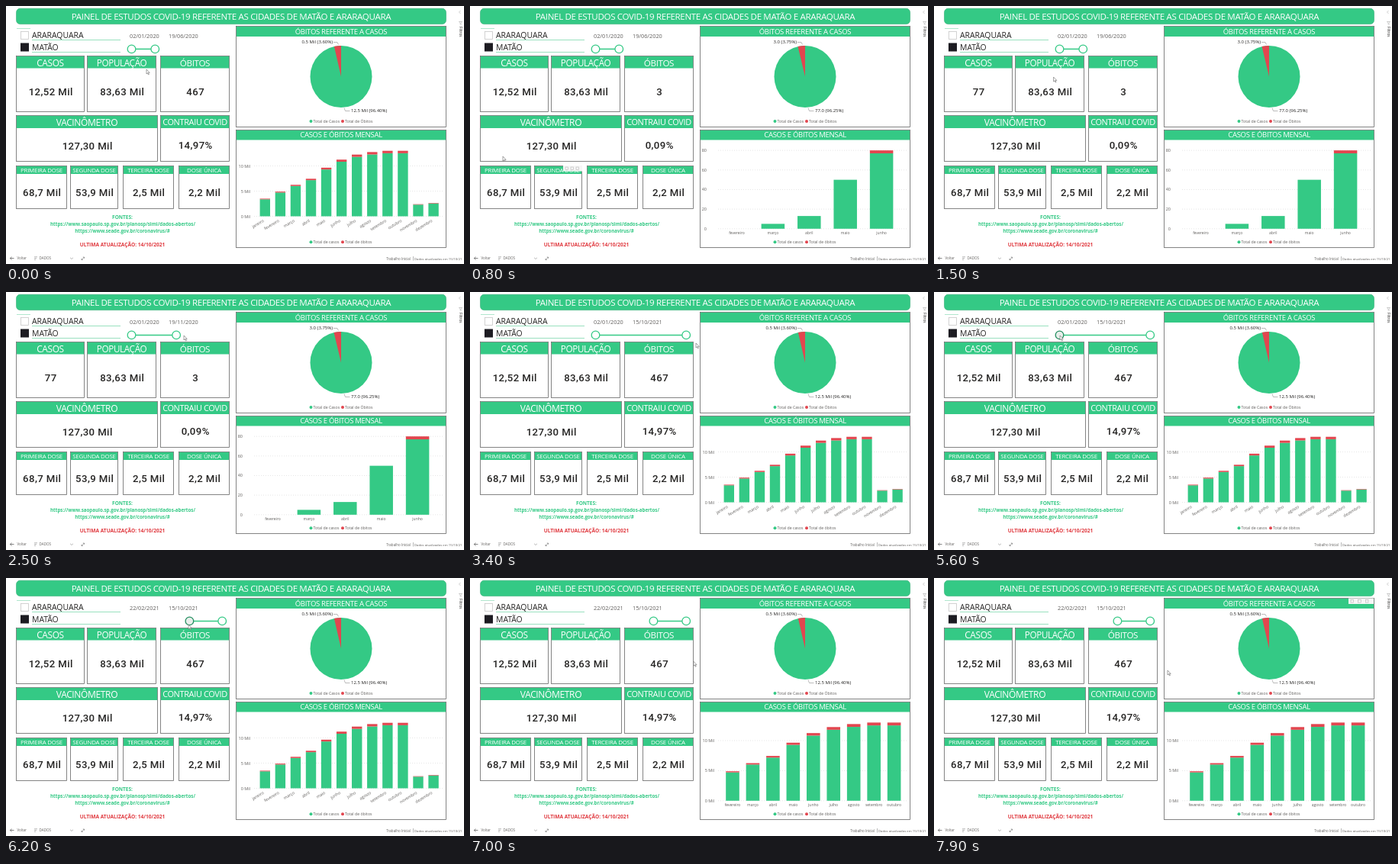
An HTML page that plays this animation: 600x338 px, repeating every 8 s.

```html
<!DOCTYPE html>
<html lang="pt">
<head>
<meta charset="utf-8">
<title>Painel</title>
<style>
html, body { margin: 0; width: 100%; height: 100%; overflow: hidden; background: #fff; }
svg { display: block; width: 100vw; height: 100vh; }
text { font-family: "Open Sans", "Noto Sans", sans-serif; }
.heading { font-weight: 500; letter-spacing: -.03em; }
.value { font-family: Roboto, "Liberation Sans", sans-serif; font-weight: 500; letter-spacing: .4px; }
</style>
</head>
<body>
<svg id="stage" viewBox="0 0 600 338"></svg>
<script>
const GREEN = '#34c985', RED = '#e2464f', INK = '#252423', GRAY = '#605e5c';
const LOOP = 8000;
const stage = document.getElementById('stage');

function add(tag, attrs, parent = stage) {
  const node = document.createElementNS('http://www.w3.org/2000/svg', tag);
  for (const key in attrs) node.setAttribute(key, attrs[key]);
  parent.appendChild(node);
  return node;
}
function rect(x, y, width, height, fill, extra = {}, parent = stage) {
  return add('rect', { x, y, width, height, fill, ...extra }, parent);
}
function path(d, stroke, width = 1, extra = {}, parent = stage) {
  return add('path', { d, stroke, 'stroke-width': width, fill: 'none', ...extra }, parent);
}
function label(str, x, y, size, fill = GRAY, anchor = 'start', extra = {}, parent = stage) {
  const node = add('text', { x, y, fill, 'font-size': size, 'text-anchor': anchor, ...extra }, parent);
  node.textContent = str;
  return node;
}
function heading(str, x, y, size) {
  label(str, x, y, size, '#fff', 'middle', { class: 'heading' });
}
function panel(x, y, right, bottom, head, title, size, baseline) {
  rect(x + .5, y + .5, right - x - 1, bottom - y - 1, '#fff', { stroke: '#666', 'stroke-width': .8 });
  rect(x + .9, y + .9, right - x - 1.8, head - y - .9, GREEN);
  heading(title, (x + right) / 2, baseline, size);
}
function card(x, y, right, bottom, head, title, size, baseline, value, valueY) {
  panel(x, y, right, bottom, head, title, size, baseline);
  return label(value, (x + right) / 2 + .7, valueY, 13.2, INK, 'middle', { class: 'value' });
}
function legend(y, names) {
  [[399.5, GREEN], [441, RED]].forEach(([cx, fill], i) => {
    add('circle', { cx, cy: y, r: 2, fill });
    label(names[i], cx + 3, y + 1.8, 5.2);
  });
}

// Header and slicers
rect(13.5, 3.3, 563, 20.4, GREEN, { rx: 5, stroke: '#45b582', 'stroke-width': .7 });
heading('PAINEL DE ESTUDOS COVID-19 REFERENTE AS CIDADES DE MATÃO E ARARAQUARA', 295, 17.6, 11.55);
path('M14 29.5H32', '#8fdcb8', .7);
rect(19.5, 33.5, 10, 10, '#fff', { stroke: '#c8c8c8', 'stroke-width': .8 });
rect(19, 48.5, 11, 11, '#1d1c22');
label('ARARAQUARA', 34, 42, 10.4, INK);
label('MATÃO', 34, 57.5, 10.4, INK);
path('M34 44.5H150M34 60.5H150', '#7fd8af', .8);

const startDate = label('', 162, 42, 7.3);
const endDate = label('', 213, 42, 7.3);
const track = path('', GREEN, 1.5);
const handles = [0, 1].map(() => add('circle', { cy: 56.4, r: 5.3, fill: '#fff', stroke: GREEN, 'stroke-width': 1.3 }));

// Cards
const cases = card(13, 65, 103, 139, 81.5, 'CASOS', 11.9, 78.9, '', 117);
card(106, 65, 197, 139, 81.5, 'POPULAÇÃO', 11.7, 78.9, '83,63 Mil', 117);
const deaths = card(202, 65, 293, 139, 81.5, 'ÓBITOS', 11.6, 78.9, '', 117);
card(13, 143, 199, 204, 160, 'VACINÔMETRO', 12, 156.7, '127,30 Mil', 188);
const share = card(202, 143, 293, 204, 160, 'CONTRAIU COVID', 10.9, 156.4, '', 187);
[[13, 80, 'PRIMEIRA', '68,7'], [84, 147, 'SEGUNDA', '53,9'], [153, 220, 'TERCEIRA', '2,5']].forEach(([x, right, name, n]) =>
  card(x, 209, right, 266, 220, name + ' DOSE', 7.9, 218.1, n + ' Mil', 248.5));
card(226, 209, 293, 266, 220, 'DOSE ÚNICA', 8, 218.1, '2,2 Mil', 248.5);

// Sources
const bold = { 'font-weight': 700 };
label('FONTES:', 152.5, 279, 6.5, GREEN, 'middle', bold);
label('https://www.saopaulo.sp.gov.br/planosp/simi/dados-abertos/', 153, 288, 6.2, GREEN, 'middle', bold);
label('https://www.seade.gov.br/coronavirus/#', 152.5, 297, 6.15, GREEN, 'middle', bold);
label('ULTIMA ATUALIZAÇÃO: 14/10/2021', 152.5, 314.5, 6.6, '#e0393f', 'middle', bold);

// Pie
panel(301, 26, 577, 159, 40, 'ÓBITOS REFERENTE A CASOS', 9.5, 36.9);
add('circle', { cx: 439, cy: 92.5, r: 40.5, fill: GREEN });
const slice = add('path', { fill: RED });
path('M429 47.5H434L435.5 50.5M443 133.5L444.5 137.5H450.5', '#a0a0a0', .7);
const deathsLabel = label('', 428, 49.3, 6, INK, 'end');
const casesLabel = label('', 452, 139.4, 6, INK);
legend(151, ['Total de Casos', 'Total de Óbitos']);

function showPie(percent) {
  const a = percent / 100 * 2 * Math.PI;
  slice.setAttribute('d', `M439 92.5L${439 - 40.5 * Math.sin(a)} ${92.5 - 40.5 * Math.cos(a)}A40.5 40.5 0 0 1 439 52Z`);
}

// Monthly bars
panel(301, 162, 577, 317, 175.5, 'CASOS E ÓBITOS MENSAL', 9.5, 172.3);
legend(309.2, ['Total de casos', 'Total de óbitos']);
const months = 'janeiro fevereiro março abril maio junho julho agosto setembro outubro novembro dezembro'.split(' ');
const thousands = [3.5, 4.9, 6.25, 7.45, 9.65, 11.25, 12.25, 12.75, 13, 13, 2.4, 2.65];

function barChart({ names, totals, dead, base, unit, first, step, width, ticks, suffix, tilt }) {
  const g = add('g', {});
  ticks.forEach(v => {
    const y = base - v * unit;
    path(`M325 ${y}H573`, '#d5d5d5', .6, { 'stroke-dasharray': '1 2' }, g);
    label(v + suffix, suffix ? 320 : 310, y + 2, 5.5, GRAY, 'end', {}, g);
  });
  names.forEach((name, i) => {
    const x = first + i * step, h = totals[i] * unit, d = dead(totals[i], i) * unit;
    rect(x - width / 2, base - h + d, width, h - d, GREEN, {}, g);
    rect(x - width / 2, base - h, width, d, RED, {}, g);
    if (tilt) label(name, 0, 0, 5.3, GRAY, 'end', { transform: `translate(${x - 1} ${base + 6.8}) rotate(-31)` }, g);
    else label(name, x, base + 7, 5, GRAY, 'middle', {}, g);
  });
  return g;
}
const portion = v => v * .037;
const charts = {
  full: barChart({ names: months, totals: thousands, dead: portion, base: 275.5, unit: 6.6,
    first: 339.3, step: 20.07, width: 13.4, ticks: [0, 5, 10], suffix: ' Mil', tilt: true }),
  early: barChart({ names: months.slice(1, 6), totals: [0, 5, 13, 50, 80], dead: (v, i) => i === 4 ? 3 : 0,
    base: 291.8, unit: 1.283, first: 349.5, step: 47.4, width: 30.5, ticks: [0, 20, 40, 60, 80], suffix: '' }),
  late: barChart({ names: months.slice(1, 10), totals: thousands.slice(1, 10), dead: portion, base: 291.8, unit: 7.88,
    first: 344, step: 26.45, width: 17.6, ticks: [0, 5, 10], suffix: ' Mil' })
};

// Surrounding chrome
path('M595.5 6L593.5 8L595.5 10M593.5 20.5H597.5L596 22.5V24.5L595 23.5V22.5Z', '#999', .5);
label('Filtros', 0, 0, 4.8, INK, 'start', { transform: 'translate(593.5 27) rotate(90)' });
path('M10.5 330.5H5.5M7.5 328.5L5.5 330.5L7.5 332.5', '#555', .7);
label('Voltar', 14.5, 332.3, 4.5);
path('M37 328.7H41M37 330.5H40M37 332.3H39', '#888', .6);
label('DADOS', 43.5, 332.3, 4.6);
path('M84 329.7L86 331.5L88 329.7', '#888', .6);
path('M99 332.5L102.5 329M100.8 329H102.5V330.7M99 330.8V332.5H100.7', '#666', .6);
label('Trabalho Inicial', 530, 332.5, 4.5, GRAY, 'end');
path('M533.5 328V333.5', '#888', .6);
label('Dados atualizados em 15/10/21', 597.5, 332.5, 4.25, GRAY, 'end');

function toolbar(x, y, width) {
  const g = add('g', {});
  rect(x, y, width, 7.5, '#f6f6f6', {}, g);
  for (let i = 0; i < 3; i++) {
    const left = x + 3 + i * (width - 4) / 3;
    rect(left, y + 2, 3.6, 3.6, 'none', { stroke: '#b5b5b5', 'stroke-width': .6 }, g);
  }
  return g;
}
const doseTools = toolbar(122, 209, 25);
const pieTools = toolbar(543, 26.5, 33);
const cursor = path('M0 0V6L1.5 4.7L2.5 7L3.4 6.6L2.4 4.4H4.2Z', '#666', .6, { fill: '#fff' });

// Motion: [time, ...values] with eased steps between keys
const cursorKeys = [[0, 184, 83], [100, 184, 83], [700, 46, 197], [800, 43, 197], [1000, 43, 197], [1750, 196, 57],
  [1900, 196, 57], [2500, 233, 57], [2950, 290, 60], [3400, 296, 67], [3700, 296, 67], [4200, 298, 97],
  [4700, 298, 97], [5350, 165, 57], [5600, 165, 57], [6200, 239, 61], [6500, 239, 61], [7200, 306, 121], [LOOP, 306, 121]];
const endKeys = [[0, 169], [1950, 169], [2500, 322], [3000, 652], [LOOP, 652]];
const startKeys = [[0, 0], [5600, 0], [6150, 417], [LOOP, 417]];

function at(keys, t) {
  const i = Math.max(1, keys.findIndex(k => k[0] > t));
  const [from, to] = [keys[i - 1], keys[i]];
  const p = (t - from[0]) / (to[0] - from[0]);
  const e = p * p * (3 - 2 * p);
  return from.slice(1).map((v, n) => v + (to[n + 1] - v) * e);
}
const dayX = day => 164.5 + day * 118.7 / 652;
const dayText = day => new Date(Date.UTC(2020, 0, 2 + Math.round(day))).toISOString().slice(0, 10).split('-').reverse().join('/');
const show = (node, on) => node.setAttribute('display', on ? 'inline' : 'none');
const write = (node, str) => { if (node.textContent !== str) node.textContent = str; };

function render(t) {
  const [start] = at(startKeys, t), [end] = at(endKeys, t), [x, y] = at(cursorKeys, t);
  const dragging = t >= 5500 && t < 6500;
  write(startDate, dayText(start));
  write(endDate, dayText(end));
  handles[0].setAttribute('cx', dayX(start));
  handles[1].setAttribute('cx', dayX(end));
  handles[0].setAttribute('fill', dragging ? '#e8eeeb' : '#fff');
  handles[0].setAttribute('stroke', dragging ? '#248f60' : GREEN);
  track.setAttribute('d', `M${dayX(start) + 5} 56.4H${dayX(end) - 5}`);

  const early = t >= 550 && t < 3200;
  write(cases, t >= 900 && t < 3200 ? '77' : '12,52 Mil');
  write(deaths, early ? '3' : '467');
  write(share, early ? '0,09%' : '14,97%');
  write(deathsLabel, early ? '3.0 (3.75%)' : '0.5 Mil (3.60%)');
  write(casesLabel, early ? '77.0 (96.25%)' : '12.5 Mil (96.40%)');
  showPie(early ? 3.75 : 3.6);
  const current = early ? 'early' : t >= 6800 ? 'late' : 'full';
  for (const name in charts) show(charts[name], name === current);

  show(doseTools, t >= 650 && t < 1000);
  show(pieTools, t >= 7150);
  cursor.setAttribute('transform', `translate(${x} ${y})`);
}

function tick() {
  render(performance.now() % LOOP);
  requestAnimationFrame(tick);
}
tick();
</script>
</body>
</html>
```
